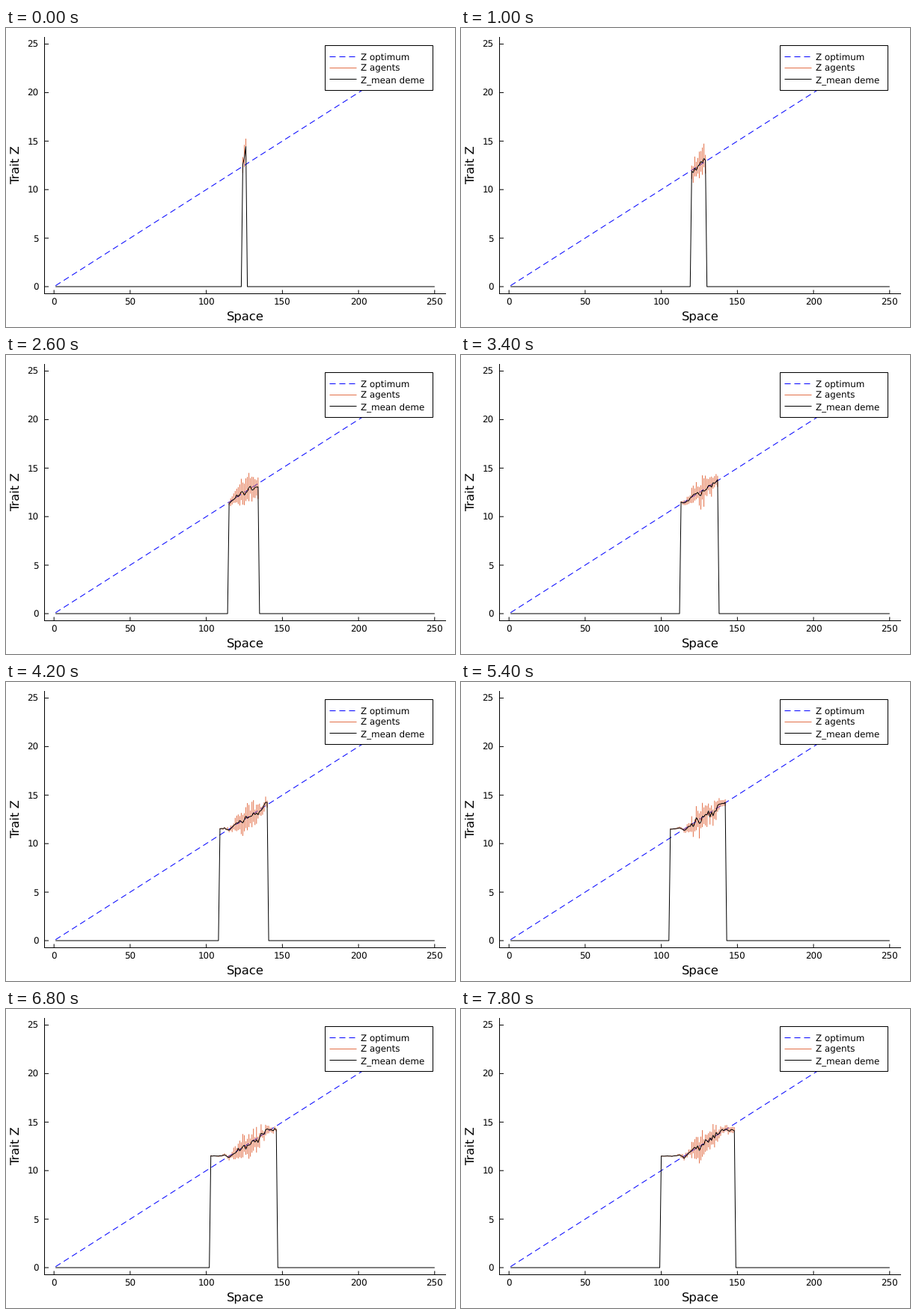
A matplotlib script that plays this animation: 600x400 px, repeating every 8 s.

```python
import numpy as np
import matplotlib.pyplot as plt
from matplotlib.animation import FuncAnimation
from matplotlib.patches import Rectangle

W, H, DPI = 600, 400, 100
FRAMES, INTERVAL = 40, 200
PX = 72 / DPI
ORANGE = "#e36f47"

plt.rcParams["font.family"] = "DejaVu Sans"
plt.rcParams["text.hinting"] = "none"
plt.rcParams["path.snap"] = False


def sx(x):
    return 64.16 + 2.0346 * np.asarray(x, float)


def sy(z):
    return 346.0 - 12.98 * np.asarray(z, float)


def edges(i):
    """Empty demes just left and right of the spreading population."""
    left = np.interp(i, [0, 10, 17, 24, 30, 39],
                     [123, 116.4, 112.2, 106, 104.3, 99.2])
    right = np.interp(i, [0, 10, 20, 24, 36, 39],
                      [127, 133.6, 141, 141.5, 149, 149])
    return int(left), int(right)


def cline(x, i):
    """Stepped climb of the mean trait; steeper just after the start."""
    steps = np.interp(x, [108, 112, 115, 118, 122, 134, 139],
                      [11.5, 11.6, 11.35, 11.8, 12.3, 13.2, 14.2])
    return steps + 0.95 * (x - 124) * np.exp(-i / 2)


def population(i):
    """Occupied demes with their mean, lowest and highest trait."""
    left, right = edges(i)
    x = np.arange(left + 1, right)
    rng = np.random.default_rng(500 + i)
    # Variation peaks mid-range and stays moderate on the right
    spread = 0.05 + 1.2 * np.exp(-((x - 127) / 9) ** 2) + 0.25 * (x > 132)
    mean = cline(x, i) + 0.18 * spread * rng.normal(size=x.size)
    low = mean - spread * rng.uniform(0.4, 1.3, x.size)
    high = mean + spread * rng.uniform(0.4, 1.3, x.size)
    return x, mean, low, np.minimum(high, 15.25)


fig = plt.figure(figsize=(W / DPI, H / DPI), dpi=DPI, facecolor="white")
ax = fig.add_axes([0, 0, 1, 1])
ax.set_xlim(0, W)
ax.set_ylim(H, 0)
ax.axis("off")


def line(xs, ys, color="black", **kw):
    kw.setdefault("solid_capstyle", "butt")
    return ax.plot(xs, ys, color=color, lw=PX, **kw)[0]


def label(x, y, text, size=11.9, **kw):
    ax.text(x, y, text, fontsize=size * PX, va="baseline", **kw)


# Axes
line([51.5, 51.5], [12, 356])
line([51, 588], [355.5, 355.5])
for v in range(0, 251, 50):
    line([sx(v)] * 2, [355.5, 350.5])
    label(sx(v), 371.3, str(v), ha="center")
for v in range(0, 26, 5):
    line([51.5, 57], [sy(v)] * 2)
    label(43.5, sy(v) + 4.4, str(v), ha="right")
label(319.5, 392, "Space", 16.4, ha="center")
label(18, 183.5, "Trait Z", 16.4, ha="center", rotation=90,
      rotation_mode="anchor")

# Data
DASH = dict(color="blue", dashes=(8, 5), dash_capstyle="butt")
line(sx([1, 248]), sy([0.1, 24.8]), zorder=2, **DASH)
agents = ax.vlines([], [], [], colors=ORANGE, lw=PX, zorder=3)
mean_line = line([], [], zorder=4, solid_joinstyle="round")

# Legend
ax.add_patch(Rectangle((426.5, 23.5), 144, 60, fc="white", ec="black",
                       lw=PX, zorder=5))
entries = [("Z optimum", DASH), ("Z agents", dict(color=ORANGE)),
           ("Z_mean deme", dict(color="black"))]
for n, (text, style) in enumerate(entries):
    y = 38.5 + 15 * n
    line([432.5, 468.5], [y, y], zorder=6, **style)
    label(474, y + 4.2, text, zorder=6)


def draw(i):
    x, mean, low, high = population(i)
    xs = np.concatenate([[1, x[0] - 1], x, [x[-1] + 1, 250]])
    zs = np.concatenate([[0, 0], mean, [0, 0]])
    mean_line.set_data(sx(xs), sy(zs))
    agents.set_segments([[(px, lo), (px, hi)] for px, lo, hi
                         in zip(sx(x), sy(low), sy(high))])
    return agents, mean_line


def reset():
    return draw(0)


anim = FuncAnimation(fig, draw, frames=FRAMES, init_func=reset,
                     interval=INTERVAL, repeat=True)
plt.show()
```
